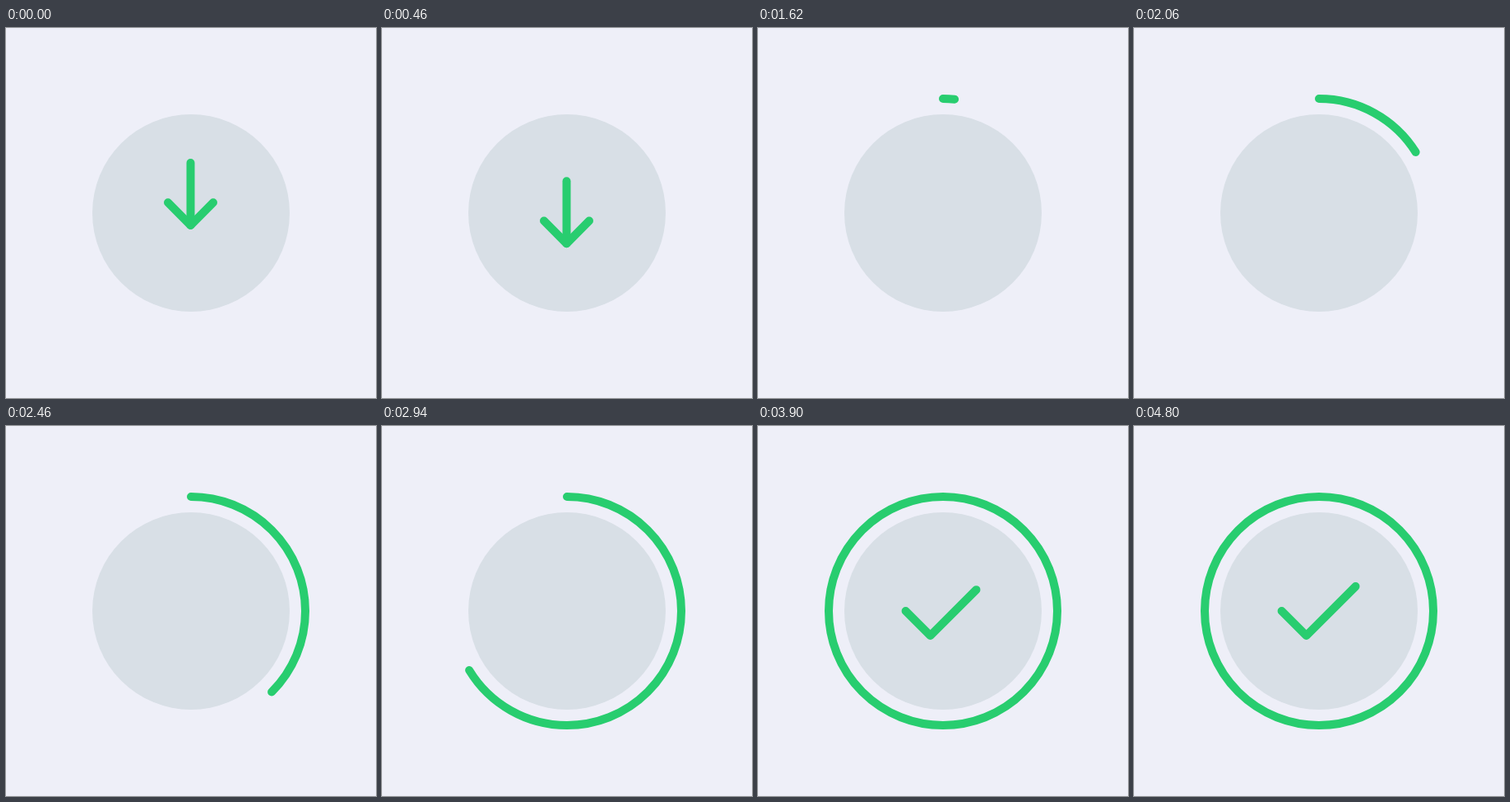
These frames come from a looping animation (450x450 px, 5580 ms). An HTML page with a canvas:

```html
<!DOCTYPE html>
<html lang="en">
<head>
<meta charset="utf-8">
<title>Download</title>
<style>
  html, body { margin: 0; width: 100%; height: 100%; overflow: hidden; background: #eeeff8; }
  canvas { display: block; width: 100vw; height: 100vh; }
</style>
</head>
<body>
<canvas id="stage"></canvas>
<script>
const SIZE = 450, MID = 225, RING = 139, LOOP = 5580;
const BACK = '#eeeff8', DISC = '#d8dfe6', GREEN = '#28cd6f';

const canvas = document.getElementById('stage');
const ctx = canvas.getContext('2d');
const scale = window.devicePixelRatio || 1;
canvas.width = canvas.height = SIZE * scale;

const span = (t, from, to) => Math.min(1, Math.max(0, (t - from) / (to - from)));
const mix = (a, b, p) => a + (b - a) * p;
const smooth = p => p * p * (3 - 2 * p);
const cubic = p => p < 0.5 ? 4 * p ** 3 : 1 - 4 * (1 - p) ** 3;

function stroke(points, alpha = 1) {
  ctx.globalAlpha = alpha;
  ctx.beginPath();
  points.forEach(([x, y]) => ctx.lineTo(x, y));
  ctx.stroke();
  ctx.globalAlpha = 1;
}

// The part of a polyline from its start up to share p of its length
function trim(points, p) {
  const lengths = points.slice(1).map(([x, y], i) => Math.hypot(x - points[i][0], y - points[i][1]));
  let left = p * lengths.reduce((a, b) => a + b);
  const out = [points[0]];
  for (let i = 0; i < lengths.length && left > 0; i++) {
    const k = Math.min(1, left / lengths[i]);
    const [a, b] = [points[i], points[i + 1]];
    out.push([mix(a[0], b[0], k), mix(a[1], b[1], k)]);
    left -= lengths[i];
  }
  return out;
}

function drawArrow(t) {
  const drop = 24 * smooth(span(t, 0, 555));
  const rise = smooth(span(t, 680, 1350));
  const top = MID - RING;
  stroke([
    [224.5, mix(164 + drop, top, rise)],
    [224.5, mix(240 + drop, top, rise) + 0.01]
  ]);

  const alpha = 1 - span(t, 930, 1110);
  if (alpha > 0) {
    const tip = mix(240 + drop, 213, smooth(span(t, 680, 1100)));
    stroke([[197, 212.3 + drop], [224.5, tip], [252, 212.3 + drop]], alpha);
  }
}

function drawRing(t) {
  const turn = smooth(span(t, 1435, 3901)) * 2 * Math.PI;
  ctx.beginPath();
  ctx.arc(MID, MID, RING, -Math.PI / 2, turn - Math.PI / 2 + 0.0001);
  ctx.stroke();
}

function drawCheck(t) {
  const p = cubic(span(t, 3454, 4030));
  if (p > 0) stroke(trim([[179.6, 225], [209.6, 255], [269.5, 195.1]], p));
}

function draw(t) {
  ctx.setTransform(scale, 0, 0, scale, 0, 0);
  ctx.fillStyle = BACK;
  ctx.fillRect(0, 0, SIZE, SIZE);
  ctx.fillStyle = DISC;
  ctx.beginPath();
  ctx.arc(MID, MID, 120, 0, 2 * Math.PI);
  ctx.fill();

  ctx.strokeStyle = GREEN;
  ctx.lineWidth = 10;
  ctx.lineCap = ctx.lineJoin = 'round';
  if (t < 1435) drawArrow(t);
  else drawRing(t);
  drawCheck(t);
}

const start = performance.now();
function tick() {
  draw((performance.now() - start) % LOOP);
  requestAnimationFrame(tick);
}
tick();
</script>
</body>
</html>
```
